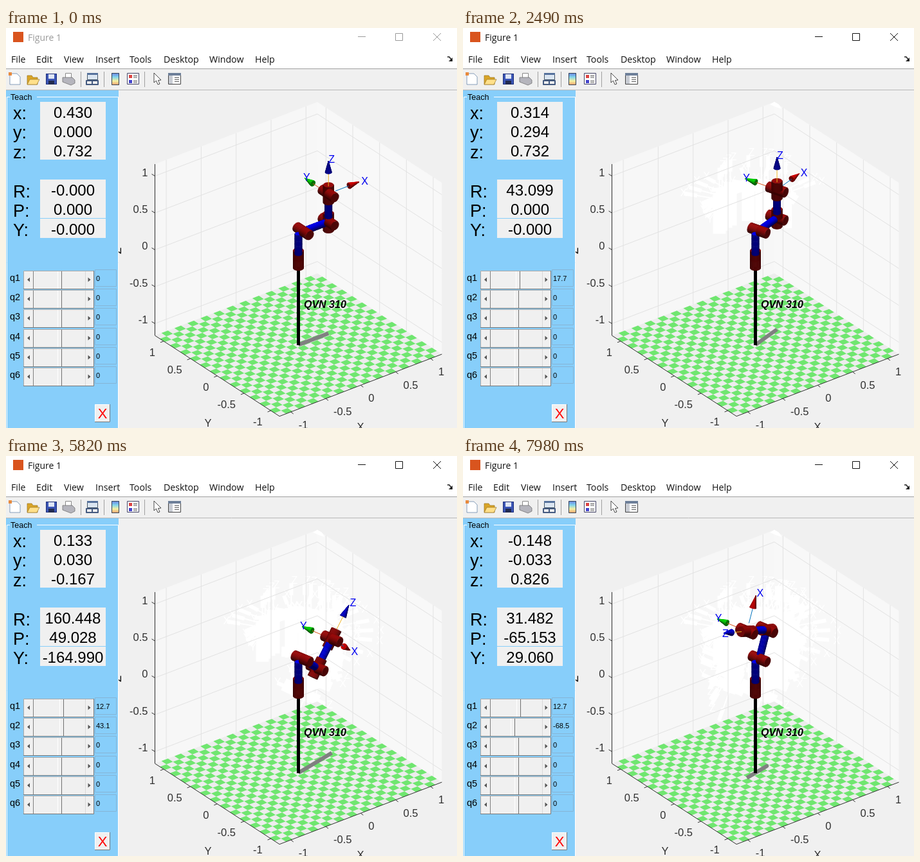
Recreate the animation shown at these times as an HTML page with a canvas. Size 701x623 px, loop 8 s.

```html
<!DOCTYPE html>
<html lang="en">
<head>
<meta charset="utf-8">
<title>Teach panel</title>
<style>
  html, body { margin: 0; width: 701px; height: 623px; overflow: hidden; background: #f0f0f0; }
  canvas { display: block; }
</style>
</head>
<body>
<canvas id="stage" width="701" height="623"></canvas>
<script>
const ctx = document.getElementById('stage').getContext('2d');
const LOOP = 8000, ACTIVE_AT = 1020;
const SANS = '"Liberation Sans", Arial, sans-serif', UI = '"Open Sans", sans-serif';
const STEP = 360 / 71;      // degrees per slider pixel
const LIM = 1.162;          // half width of the workspace
const TILES = 25;
const TICKS = [-1, -0.5, 0, 0.5, 1];

// Slider drags: [time, slider pixels] for the first two joints.
const drags = [
  [[1110, 1.5], [1290, 3.5], [1430, 6.5], [1560, 12.5], [1680, 18.5], [1750, 22.5], [1920, 24.5],
   [2260, 20.5], [2360, 8.5], [2460, 3.5], [2560, 1.5], [2660, -6.5], [2760, -13.5], [2860, -20.5],
   [2960, -24.5], [3090, -19.5], [3450, -25.5], [3560, -16.5], [3660, -9.5], [3760, -3.5],
   [3860, 1.5], [3930, 2.5]],
  [[4620, 5.01e-15], [4800, 0.5], [5100, 5.5], [5190, 13.5], [5280, 20.5], [5360, 25.5], [5800, 8.5],
   [5900, 2.5], [6010, -2.5], [6110, -7.5], [6220, -12.5], [6340, -17.5], [6570, -21.5], [6890, -24.5],
   [7040, -29.5], [7380, -25.5], [7500, -22.5], [7610, -18.5], [7900, -13.5], [8060, -6.5]]
];
const states = [{ t: -1000, q: [0, 0] }];
drags.forEach((list, joint) => list.forEach(([t, n]) => {
  const q = states[states.length - 1].q.slice();
  q[joint] = n;
  states.push({ t, q });
}));
const indexAt = t => states.findLastIndex(s => s.t <= t);

// Vectors and projection
const add = (a, b, k = 1) => a.map((v, i) => v + k * b[i]);
const mul = (a, k) => a.map(v => v * k);
const dot = (a, b) => a[0] * b[0] + a[1] * b[1] + a[2] * b[2];
const cross = (a, b) => [a[1] * b[2] - a[2] * b[1], a[2] * b[0] - a[0] * b[2], a[0] * b[1] - a[1] * b[0]];
const unit = a => mul(a, 1 / Math.hypot(...a));
const VIEW = unit([-0.523, -0.682, 0.512]), LIGHT = unit([-0.12, -0.2, 0.97]), UP = [0, 0, 1];
const project = ([x, y, z]) => [454.5 + 108.6 * x - 83.3 * y, 360 - 41.6 * x - 54.1 * y - 114.9 * z];

// Drawing helpers
function trace(points, closed) {
  ctx.beginPath();
  points.forEach(p => ctx.lineTo(p[0], p[1]));
  if (closed) ctx.closePath();
}
function fill(points, color, edge) {
  trace(points, true);
  ctx.fillStyle = color;
  ctx.fill();
  if (edge) { ctx.strokeStyle = edge; ctx.lineWidth = 0.7; ctx.stroke(); }
}
function line(points, color, width = 1) {
  trace(points);
  ctx.strokeStyle = color;
  ctx.lineWidth = width;
  ctx.stroke();
}
function box(x, y, w, h, color, edge) {
  ctx.fillStyle = color;
  ctx.fillRect(x, y, w, h);
  if (edge) { ctx.strokeStyle = edge; ctx.lineWidth = 1; ctx.strokeRect(x + 0.5, y + 0.5, w - 1, h - 1); }
}
// y is the middle of the capital letters
function text(str, x, y, size, color = '#000', align = 'left', family = SANS, style = '') {
  ctx.font = `${style} ${size}px ${family}`;
  ctx.textAlign = align;
  ctx.fillStyle = color;
  ctx.fillText(str, x, y + size * 0.36);
}
function shade(color, normal) {
  const k = 0.38 + 0.65 * Math.max(0, dot(normal, LIGHT));
  return `rgb(${color.map(c => Math.min(255, c * k | 0))})`;
}

// A lit cylinder or cone from a to b
function tube(a, b, ra, rb, color) {
  const axis = add(b, a, -1), w = unit(axis);
  const u = unit(cross(w, Math.abs(w[2]) > 0.9 ? [1, 0, 0] : UP)), v = cross(w, u);
  const slope = (ra - rb) / Math.hypot(...axis), N = 24;
  const dir = k => add(mul(u, Math.cos(k * 2 * Math.PI / N)), v, Math.sin(k * 2 * Math.PI / N));
  for (let k = 0; k < N; k++) {
    const n = unit(add(dir(k + 0.5), w, slope));
    if (dot(n, VIEW) < -0.05) continue;
    const d = dir(k), e = dir(k + 1), c = shade(color, n);
    fill([add(a, d, ra), add(a, e, ra), add(b, e, rb), add(b, d, rb)].map(project), c, c);
  }
  const front = dot(w, VIEW) > 0, r = front ? rb : ra;
  if (r) {
    const ring = Array.from({ length: N }, (_, k) => project(add(front ? b : a, dir(k), r)));
    fill(ring, shade(color, front ? w : mul(w, -1)));
  }
}

function solve(q) {
  const [a, b] = q.map(n => n * STEP * Math.PI / 180);
  const c1 = Math.cos(a), s1 = Math.sin(a), c2 = Math.cos(b), s2 = Math.sin(b);
  const X = [c1 * c2, s1 * c2, -s2], Y = [-s1, c1, 0], Z = [c1 * s2, s1 * s2, c2];
  const shoulder = [0.07 * c1, 0.07 * s1, 0.352];
  const elbow = add(shoulder, X, 0.36), wrist = add(elbow, Z, 0.38);
  return { X, Y, Z, shoulder, elbow, wrist };
}
function axisLabels(arm, color) {
  for (const name of ['X', 'Y', 'Z']) {
    const [x, y] = project(add(arm.wrist, arm[name], 0.47));
    text(name, x, y, 16, color);
  }
}

function drawArm(arm) {
  const { X, Y, Z, shoulder, elbow, wrist } = arm;
  const RED = [150, 12, 12], BLUE = [0, 0, 230], parts = [];
  const put = (a, b, draw) => parts.push({ depth: dot(add(a, b), VIEW), draw });
  const solid = (a, b, ra, rb, color) => put(a, b, () => tube(a, b, ra, rb, color));
  const joint = (c, axis) => [-0.12, 0.12].forEach(h => solid(c, add(c, axis, h), 0.059, 0.059, RED));
  const link = (a, b, trim) => {
    const d = add(b, a, -1), cut = trim / Math.hypot(...d), n = 5;
    const at = i => add(a, d, cut + (1 - 2 * cut) * i / n);
    for (let i = 0; i < n; i++) solid(at(i), at(i + 1), 0.04, 0.04, BLUE);
  };
  joint([0, 0, 0], UP);
  link([0, 0, 0], [0, 0, 0.345], 0);
  joint(shoulder, Y);
  link(shoulder, elbow, 0.05);
  joint(elbow, Y);
  joint(elbow, Z);
  link(elbow, wrist, 0.06);
  joint(wrist, Y);
  joint(wrist, Z);
  [[X, '#0072bd', [215, 0, 0]], [Y, '#d95319', [0, 220, 0]], [Z, '#edb120', [0, 0, 200]]].forEach(([d, stroke, cone]) => {
    const a = add(wrist, d, 0.1), b = add(wrist, d, 0.29);
    put(a, b, () => line([a, b].map(project), stroke));
    solid(b, add(wrist, d, 0.44), 0.037, 0, cone);
  });

  const shadow = [[0, 0], shoulder, elbow, wrist].map(p => project([p[0], p[1], -LIM]));
  ctx.lineJoin = 'round';
  line(shadow, '#808080', 6);
  line([[454.5, 494], [454.5, 372]], '#000', 5);
  parts.sort((a, b) => a.depth - b.depth).forEach(p => p.draw());
  axisLabels(arm, '#0000f0');
}

// White smear left behind by earlier poses
function drawTrail(past) {
  for (const { q } of past) {
    const arm = solve(q), w = project(arm.wrist);
    ctx.lineCap = 'square';
    line([project(arm.elbow), w], '#fff', 20);
    line([add(arm.wrist, arm.Y, -0.12), add(arm.wrist, arm.Y, 0.12)].map(project), '#fff', 16);
    for (const d of [arm.X, arm.Y, arm.Z]) {
      line([w, project(add(arm.wrist, d, 0.27))], '#fff', 2);
      line([0.29, 0.4].map(k => project(add(arm.wrist, d, k))), '#fff', 6);
    }
    axisLabels(arm, '#fff');
  }
  ctx.lineCap = 'butt';
}

function drawScene(t) {
  const L = LIM, wall = (pts, color) => fill(pts.map(project), color);
  wall([[-L, L, -L], [-L, L, L], [L, L, L], [L, L, -L]], '#f7f7f7');
  wall([[L, L, -L], [L, L, L], [L, -L, L], [L, -L, -L]], '#f8f8f8');
  if (t >= 180) fill([[477, 119], [484, 115], [491, 119], [495, 126], [486, 123]], '#fff');
  const now = indexAt(t);
  drawTrail(states.slice(0, now));
  for (const k of TICKS) {
    line([[k, L, -L], [k, L, L]].map(project), '#e2e2e2');
    line([[L, k, -L], [L, k, L]].map(project), '#e2e2e2');
    line([[-L, L, k], [L, L, k], [L, -L, k]].map(project), '#e2e2e2');
  }
  wall([[-L, -L, -L], [L, -L, -L], [L, L, -L], [-L, L, -L]], '#ededed');
  const edge = i => -L + 2 * L * i / TILES;
  for (let i = 0; i < TILES; i++) for (let j = 1 - i % 2; j < TILES; j += 2) {
    const x = edge(i), y = edge(j), x2 = edge(i + 1), y2 = edge(j + 1);
    wall([[x, y, -L], [x2, y, -L], [x2, y2, -L], [x, y2, -L]], '#70e670');
  }
  line([[-L, L, L], [-L, L, -L], [-L, -L, -L], [L, -L, -L]].map(project), '#303030');
  const tick = (p, dx, dy, lx, ly, k, align) => {
    const [x, y] = project(p);
    line([[x, y], [x + dx, y + dy]], '#303030');
    text(k, x + lx, y + ly, 16.5, '#303030', align);
  };
  for (const k of TICKS) {
    tick([k, -L, -L], 4, 3, 12, 20, k, 'left');
    tick([-L, k, -L], -5, 2, -13, 17, k, 'right');
    tick([-L, L, k], -5, -3, -11, -6, k, 'right');
  }
  text('Y', 314, 615, 16.5, '#303030', 'center');
  text('X', 551, 621, 16.5, '#303030', 'center');
  ctx.save();
  ctx.translate(173, 347);
  ctx.rotate(-Math.PI / 2);
  text('Z', 0, 0, 16.5, '#000', 'center');
  ctx.restore();
  drawArm(solve(states[now].q));
  text('QVN 310', 463, 430, 16, '#000', 'left', SANS, 'italic bold');
}

function readout(q) {
  const { X, Y, Z, wrist } = solve(q), deg = 180 / Math.PI, tiny = 1e-9;
  return [...wrist,
    Math.atan2(-Y[0], X[0]) * deg - tiny,
    Math.asin(Z[0]) * deg,
    Math.atan2(-Z[1], Z[2]) * deg - tiny].map(v => v.toFixed(3));
}

function drawPanel(t) {
  box(0, 97, 175, 526, '#87cefa');
  line([[6, 107.5], [1.5, 107.5], [1.5, 623]], '#fff');
  line([[48, 107.5], [174.5, 107.5], [174.5, 623]], '#fff');
  text('Teach', 7, 107.5, 12.5);

  box(53, 115, 102, 90, '#f0f0f0');
  box(53, 236, 102, 91, '#f0f0f0');
  line([[53, 296.5], [155, 296.5]], '#87cefa');
  const values = readout(states[indexAt(t - 60)].q);
  ['x:', 'y:', 'z:', 'R:', 'P:', 'Y:'].forEach((name, i) => {
    const y = 131 + 30.2 * i + (i > 2 ? 31 : 0);
    text(name, 11, y + 1.5, 27);
    text(values[i], 104, y, 24, '#000', 'center');
  });

  const thumb = states[indexAt(t + 90)].q, shown = states[indexAt(t)].q;
  for (let i = 0; i < 6; i++) {
    const y = Math.round(378 + 30.2 * i), n = thumb[i] || 0, v = (shown[i] || 0) * STEP;
    text(`q${i + 1}`, 6, y + 10.5, 14.5);
    box(27, y, 110, 29, '#f0f0f0', '#a8a8a8');
    line([[27, y + 28.5], [136.5, y + 28.5], [136.5, y]], '#777');
    line([[42.5, y + 1], [42.5, y + 28]], '#808080');
    line([[123.5, y + 1], [123.5, y + 28]], '#d8d8d8');
    const edge = Math.round(87 + n) - 0.5;
    line([[edge - 6, y + 1], [edge - 6, y + 28]], '#fff');
    line([[edge, y + 1], [edge, y + 28]], '#707070');
    fill([[33, y + 14], [37, y + 10.5], [37, y + 17.5]], '#555');
    fill([[131.5, y + 14], [127.5, y + 10.5], [127.5, y + 17.5]], '#555');
    box(138, y - 2, 34, 27, '#87cefa', '#86b5d6');
    ctx.save();
    ctx.beginPath();
    ctx.rect(139, y, 33, 24);
    ctx.clip();
    text(v ? v.toPrecision(3).slice(0, v < 1e-9 && v > 0 ? 5 : 9) : '0', 140, y + 12.5, 11);
    ctx.restore();
  }
  box(138, 586, 24, 28, '#f0f0f0', '#fff');
  line([[138, 613.5], [161.5, 613.5], [161.5, 586]], '#777');
  text('X', 150, 600, 22, '#f00', 'center');
}

function drawToolbar() {
  fill([[6, 71], [17, 71], [22, 76], [22, 88], [6, 88]], '#fff', '#5577a0');
  box(4, 69, 5, 5, '#e88a3c');
  fill([[33, 74], [40, 74], [42, 77], [49, 77], [49, 88], [33, 88]], '#d9a528', '#9a7420');
  fill([[37, 80], [52, 80], [48, 88], [33, 88]], '#ffe08a', '#9a7420');
  box(62, 71, 17, 17, '#3b55b5', '#1e2f78');
  box(66, 72, 9, 7, '#dfe6f5');
  box(66, 82, 9, 6, '#222b50');
  box(92, 70, 10, 8, '#fff', '#888');
  fill([[88, 77], [103, 77], [107, 81], [107, 86], [101, 89], [88, 84]], '#b5b5bd', '#666');
  box(126, 70, 17, 11, '#dbe6f2', '#456');
  box(126, 70, 17, 3, '#55719c');
  ctx.lineWidth = 2;
  ctx.strokeStyle = '#445a80';
  ctx.strokeRect(125, 82, 9, 6);
  ctx.strokeRect(134, 82, 9, 6);
  const ramp = ctx.createLinearGradient(0, 70, 0, 89);
  ['#6a7de0', '#7fd4ec', '#f7f0a0', '#ee9a6a'].forEach((c, i) => ramp.addColorStop(i / 3, c));
  box(164, 70, 12, 19, ramp, '#345');
  box(188, 70, 19, 18, '#fff', '#446');
  box(191, 73, 5, 5, '#d44');
  box(191, 81, 5, 5, '#44c');
  for (const y of [74.5, 77, 82.5, 85]) line([[198, y], [204, y]], '#555');
  fill([[230, 70], [230, 85], [233.5, 82], [236, 88], [239, 87], [236.5, 81.5], [241, 81]], '#fff', '#000');
  box(252, 70, 20, 18, '#fff', '#444');
  box(252, 70, 20, 4, '#6d7f99');
  box(253, 74, 6, 13, '#c9cdd4');
  for (const y of [77.5, 80.5, 83.5]) line([[262, y], [269, y]], '#555');
  for (const x of [116.5, 152.5, 215.5]) line([[x, 68], [x, 92]], '#a0a0a0');
}

function drawWindow(t) {
  const ink = t < ACTIVE_AT ? '#999' : '#111';
  box(0, 0, 701, 64, '#fff');
  box(11, 6, 16, 16, '#d9541e');
  text('Figure 1', 34, 15, 14, ink, 'left', UI);
  line([[547, 13.5], [559, 13.5]], ink);
  ctx.strokeStyle = ink;
  ctx.strokeRect(605.5, 8.5, 11, 11);
  line([[664, 8], [676, 20]], ink);
  line([[676, 8], [664, 20]], ink);
  [['File', 8], ['Edit', 47], ['View', 90], ['Insert', 139], ['Tools', 192], ['Desktop', 245], ['Window', 316], ['Help', 387]]
    .forEach(([name, x]) => text(name, x, 49, 14.2, '#111', 'left', UI));
  line([[686, 45], [689, 45], [692, 49]], '#222', 1.5);
  fill([[694, 46], [694, 52], [688, 52]], '#222');
  line([[0, 63.5], [701, 63.5]], '#a0a0a0');
  line([[0, 96.5], [701, 96.5]], '#b8b8b8');
  drawToolbar();
}

function frame(now) {
  const t = now % LOOP;
  box(0, 0, 701, 623, '#f0f0f0');
  drawScene(t);
  drawPanel(t);
  drawWindow(t);
  requestAnimationFrame(frame);
}
requestAnimationFrame(frame);
</script>
</body>
</html>
```
